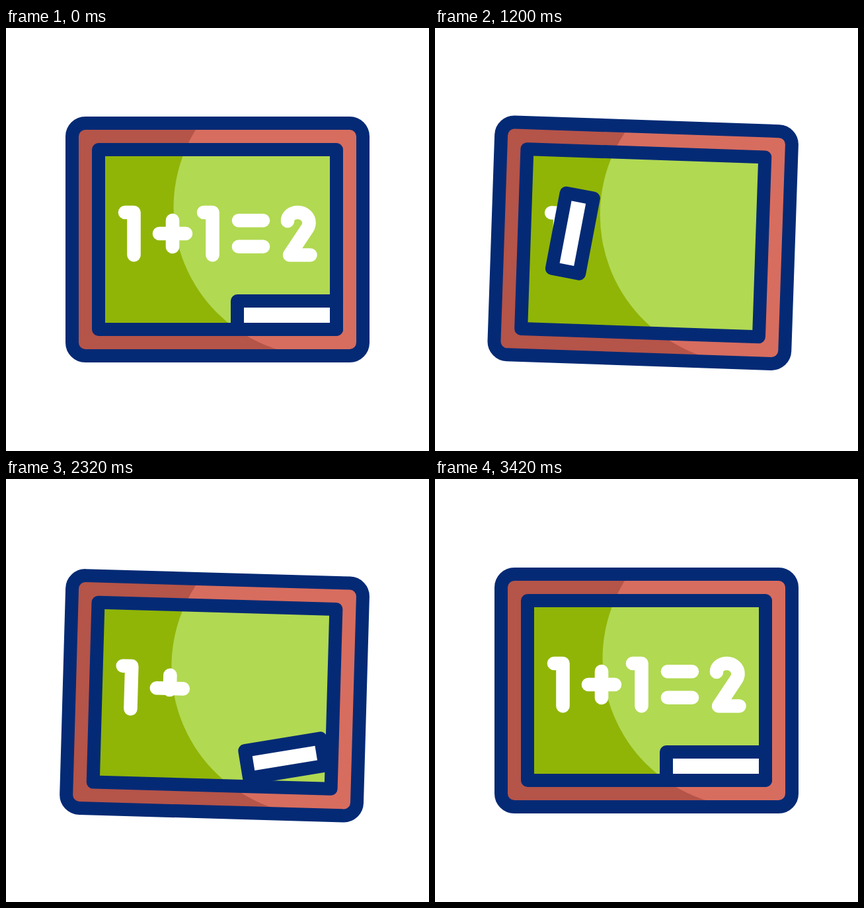
Write an HTML page that moves like this. It is 640x640 px and loops after 3.6 s.

```html
<!DOCTYPE html>
<html lang="en">
<head>
<meta charset="utf-8">
<title>Blackboard sum</title>
<style>
  html, body { margin: 0; width: 100%; height: 100%; overflow: hidden; background: #fff; }
  svg { display: block; width: 100vw; height: 100vh; }
  .line { fill: none; stroke: #042a75; stroke-width: 20; stroke-linejoin: round; }
  .chalk { fill: none; stroke: #fff; stroke-width: 20.6; stroke-linecap: round; stroke-linejoin: round; }
</style>
</head>
<body>
<svg viewBox="0 0 640 640">
  <defs>
    <clipPath id="frame"><rect x="100" y="144" width="440" height="352" rx="20"/></clipPath>
    <clipPath id="slate"><rect x="140" y="184" width="360" height="272"/></clipPath>
    <clipPath id="kept"><rect id="keptHalf" x="-900" y="-1200" width="1800" height="1200"/></clipPath>
  </defs>
  <g id="board">
    <g clip-path="url(#frame)">
      <rect x="100" y="144" width="440" height="352" fill="#b55449"/>
      <circle cx="478.5" cy="272" r="225" fill="#d76d5f"/>
    </g>
    <g clip-path="url(#slate)">
      <rect x="140" y="184" width="360" height="272" fill="#90b507"/>
      <circle cx="478.5" cy="272" r="225" fill="#b1d952"/>
    </g>
    <rect class="line" x="100" y="144" width="440" height="352" rx="20"/>
    <rect class="line" x="140" y="184" width="360" height="272"/>
    <g id="sum" class="chalk" clip-path="url(#kept)">
      <path d="M180 279H193.5V343.5"/>
      <path d="M232 311H272"/>
      <path d="M252 291V331"/>
      <path d="M299 279H312.5V343.5"/>
      <path d="M352 291.3H389"/>
      <path d="M352 330.7H389"/>
      <path d="M426 292C426 284 433 279 441.500 279C451 279 458.500 286 458.500 295C458.500 299 457 302 454 306L429 343.500H460.500"/>
    </g>
    <rect id="eraser" class="line" style="fill:#fff"/>
  </g>
</svg>
<script>
  const LOOP = 3600;
  const SWEEP = 535, CLEAN = 1335, WRITE = 1806, DONE = 3420;
  const $ = id => document.getElementById(id);
  const board = $('board'), sum = $('sum'), eraser = $('eraser'), keptHalf = $('keptHalf');

  const strokes = [...sum.children].map(el => ({ el, len: el.getTotalLength() }));
  const total = strokes.reduce((s, k) => s + k.len, 0);

  // Tables of [time, value]
  const lift = [[220, 0], [760, -48], [1300, 10], [1840, -48], [2380, 9.5], [2920, 0]];
  const tilt = [[480, 0], [1050, 3], [1600, -3], [2150, 3], [2690, -3], [3210, 0]];
  const ex = [[220, 425], [SWEEP, 465], [CLEAN, 195], [1830, 399], [2330, 429], [2520, 425]];
  const ey = [[220, 434.5], [SWEEP, 316.3], [CLEAN, 308.6], [1830, 314.7], [2520, 434.5]];
  const turn = [[220, 0], [SWEEP, -40.9], [CLEAN, -84.1], [1830, -57], [2520, 0]];
  const size = [[220, 150], [400, 116], [2330, 116], [2520, 150]];
  const chalk = [[WRITE, 0], [2320, 140], [2680, 229], [DONE, total]];

  const smooth = p => (1 - Math.cos(Math.PI * p)) / 2;
  const linear = p => p;

  function at(keys, t, ease = smooth) {
    if (t <= keys[0][0]) return keys[0][1];
    for (let i = 1; i < keys.length; i++) {
      const [t0, a] = keys[i - 1], [t1, b] = keys[i];
      if (t < t1) return a + (b - a) * ease((t - t0) / (t1 - t0));
    }
    return keys[keys.length - 1][1];
  }

  function drawSum(t) {
    const writing = t >= CLEAN && t < DONE;
    let left = writing ? at(chalk, t, linear) : total;
    for (const { el, len } of strokes) {
      el.style.display = left > 0 ? '' : 'none';
      el.style.strokeDasharray = left < len ? `${Math.max(left, 0)} 999` : 'none';
      left -= len;
    }
  }

  function draw(t) {
    board.setAttribute('transform', `translate(0 ${at(lift, t)}) rotate(${at(tilt, t)} 320 164)`);

    const pose = `translate(${at(ex, t)} ${at(ey, t)}) rotate(${at(turn, t)})`;
    const w = at(size, t), h = 42 + (w - 116) / 34;
    eraser.setAttribute('transform', pose);
    eraser.setAttribute('x', -w / 2);
    eraser.setAttribute('y', -h / 2);
    eraser.setAttribute('width', w);
    eraser.setAttribute('height', h);

    // Chalk survives only ahead of the sweeping eraser
    const sweeping = t >= SWEEP && t < CLEAN;
    keptHalf.setAttribute('transform', sweeping ? pose : 'translate(320 900)');
    drawSum(t);
  }

  const start = performance.now();
  function tick() {
    draw((performance.now() - start) % LOOP);
    requestAnimationFrame(tick);
  }
  draw(0);
  requestAnimationFrame(tick);
</script>
</body>
</html>
```
